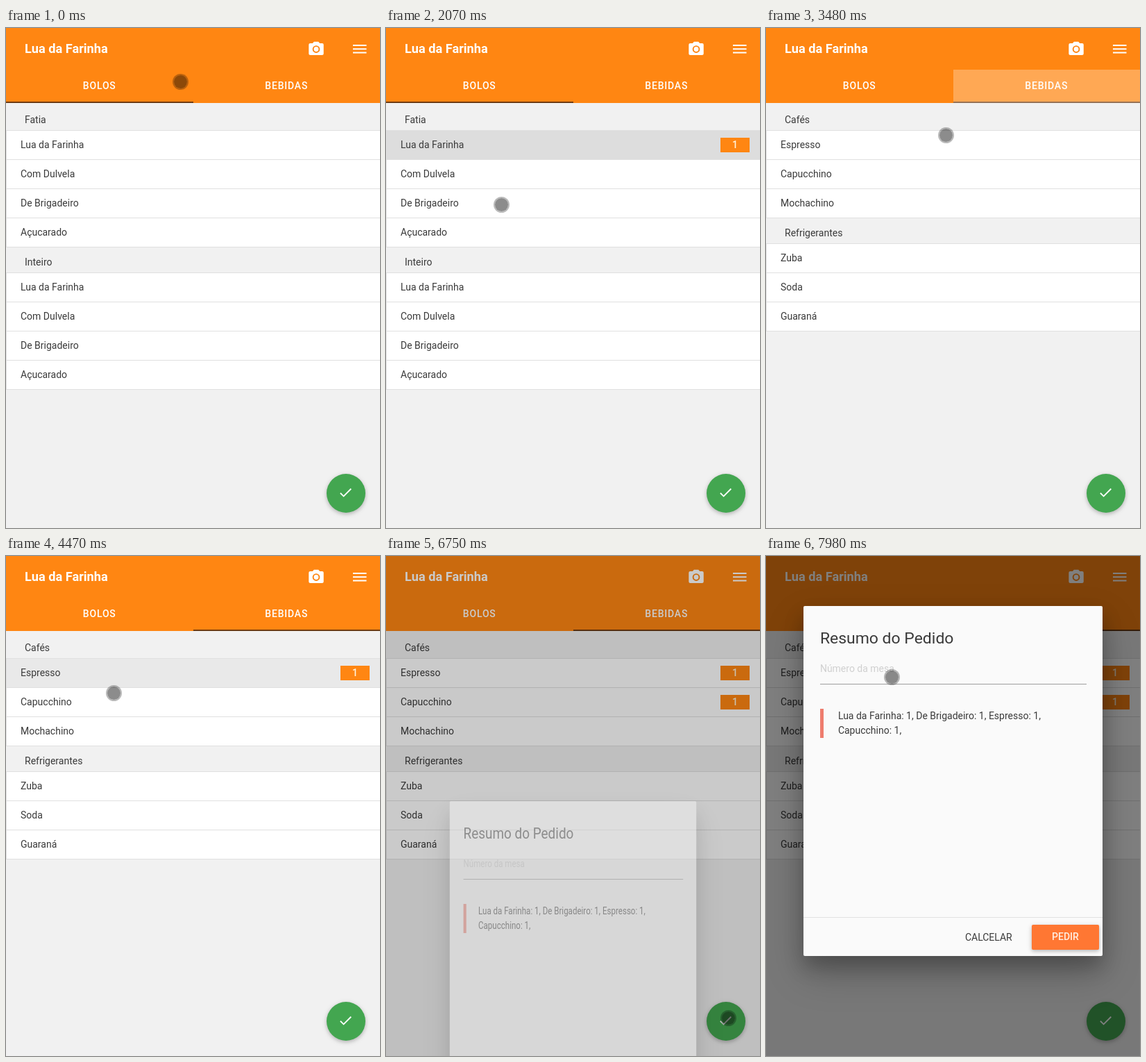
An HTML page for the animation above (8 s loop, 539 px wide and 720 px high).

```html
<!DOCTYPE html>
<html lang="pt">
<head>
<meta charset="utf-8">
<title>Pedido</title>
<style>
  html, body { margin: 0; width: 100%; height: 100%; overflow: hidden; }
  body { background: #f1f1f1; font: 14px/20px Roboto, sans-serif; color: #3a3a3a; }
  div, span, svg { position: absolute; box-sizing: border-box; white-space: nowrap; }
  #stage { left: 0; top: 0; width: 539px; height: 720px; overflow: hidden; background: #f1f1f1; }
  #bar { width: 539px; height: 108px; background: #ff8612; color: #fff; }
  #brand { left: 27px; top: 20px; font-size: 18.2px; font-weight: 700; }
  .tab { top: 60px; width: 269.5px; line-height: 47px; height: 48px; text-align: center; font-weight: 500; letter-spacing: .8px; overflow: hidden; }
  #ripple { width: 620px; height: 620px; margin: -310px; left: 130px; top: 25px; border-radius: 50%; background: #fff; }
  #line { top: 106px; height: 2px; background: #6d3a10; }
  .page { width: 539px; }
  .label { left: 27px; }
  .row { width: 540px; height: 43px; border: 1px solid #e0e0e0; line-height: 41px; padding-left: 20px; }
  .badge { left: 481px; top: 10px; width: 42px; height: 21px; line-height: 21px; background: #ff8612; color: #fff3dc; text-align: center; font-weight: 500; }
  #fab { left: 462px; top: 642px; width: 56px; height: 56px; border-radius: 50%; background: #43a650; box-shadow: 0 2px 5px rgba(0,0,0,.16), 0 2px 8px rgba(0,0,0,.12); }
  #shade { inset: 0; background: #000; }
  #modal { left: 53.9px; width: 431.2px; height: 504px; background: #fafafa; border-radius: 2px;
    box-shadow: 0 16px 28px rgba(0,0,0,.22), 0 25px 55px rgba(0,0,0,.21); }
  #modal h5 { position: absolute; margin: 0; left: 24px; top: 34px; font-size: 22.96px; line-height: 26px; font-weight: 400; }
  #field { left: 24px; top: 80px; width: 384px; height: 33px; color: #d0d0d0; border-bottom: 1px solid #9e9e9e; }
  #quote { left: 24px; top: 148px; height: 42px; line-height: 21px; border-left: 5px solid #ee7d6e; padding-left: 21px; }
  #foot { left: 0; top: 448px; width: 431px; height: 56px; border-top: 1px solid #e2e2e2; }
  #cancel { left: 233px; top: 18px; }
  #order { left: 329px; top: 10px; width: 97px; height: 36px; line-height: 35px; text-align: center; font-weight: 500; color: #ffeee2; background: #ff7733; border-radius: 2px; box-shadow: 0 2px 5px rgba(0,0,0,.18), 0 2px 8px rgba(0,0,0,.12); }
  #cursor { width: 23px; height: 23px; margin: -11.5px; border-radius: 50%; background: rgba(0,0,0,.45); background-clip: padding-box; border: 2px solid rgba(0,0,0,.27); }
</style>
</head>
<body>
<div id="stage">
  <div id="bar">
    <span id="brand">Lua da Farinha</span>
    <svg width="539" height="60" fill="#fff">
      <path transform="translate(434.2 17.7) scale(1.07)" d="M9 2 7.2 4H4a2 2 0 0 0-2 2v12a2 2 0 0 0 2 2h16a2 2 0 0 0 2-2V6a2 2 0 0 0-2-2h-3.2L15 2zm3 15a5 5 0 1 1 0-10 5 5 0 0 1 0 10zm0-1.8a3.2 3.2 0 1 0 0-6.4 3.2 3.2 0 0 0 0 6.4z"/>
      <path d="M500 24h19.5v2H500zm0 5.2h19.5v2H500zm0 5.2h19.5v2H500z"/>
    </svg>
    <div id="line"></div>
    <div class="tab">BOLOS</div>
    <div class="tab" style="left:269.5px">BEBIDAS<div id="ripple"></div></div>
  </div>
  <div class="page" id="cakes"></div>
  <div class="page" id="drinks"></div>
  <div id="fab"><svg width="56" height="56" fill="#fff"><path transform="translate(16 15.5) scale(.95)" d="M9 16.2 4.8 12l-1.4 1.4L9 19 21 7l-1.4-1.4z"/></svg></div>
  <div id="shade"></div>
  <div id="modal">
    <h5>Resumo do Pedido</h5>
    <div id="field">Número da mesa</div>
    <div id="quote">Lua da Farinha: 1, De Brigadeiro: 1, Espresso: 1,<br>Capucchino: 1,</div>
    <div id="foot"><span id="cancel">CALCELAR</span><div id="order">PEDIR</div></div>
  </div>
  <div id="cursor"></div>
</div>
<script>
const LOOP = 8000, TAB_TAP = 3160, RIPPLE = 3080, OPEN = 6595;
const $ = id => document.getElementById(id);
const clamp = u => Math.min(1, Math.max(0, u));
const swing = u => .5 - Math.cos(Math.PI * clamp(u)) / 2;
const easeOut = u => 1 - (1 - clamp(u)) ** 2;

// Each tapped row: page, row index, tap time, time of the next tap.
const taps = [
  ['cakes', 0, 1250, 2450], ['cakes', 2, 2450, TAB_TAP],
  ['drinks', 0, 4370, 4980], ['drinks', 1, 4980, 6560],
];

// Cursor stops: time, x, y.
const path = [
  [0, 251, 77], [250, 251, 77], [900, 152, 170], [1250, 152, 170],
  [1850, 166, 254], [2280, 166, 254], [2900, 398, 84], [3120, 398, 84],
  [3480, 260, 154], [3900, 152, 174], [4250, 152, 174], [4470, 155, 197],
  [4700, 158, 213], [4980, 158, 213], [5750, 493, 665], [7050, 493, 665],
  [7850, 181, 174], [LOOP, 181, 174],
];

function buildPage(id, groups) {
  let top = 147;
  for (const [label, ...items] of groups) {
    $(id).insertAdjacentHTML('beforeend', `<span class="label" style="top:${top - 25}px">${label}</span>`);
    for (const item of items) {
      $(id).insertAdjacentHTML('beforeend',
        `<div class="row" style="top:${top}px">${item}<div class="badge" hidden>1</div></div>`);
      top += 42;
    }
    top += 37;
  }
}
const flavours = ['Lua da Farinha', 'Com Dulvela', 'De Brigadeiro', 'Açucarado'];
buildPage('cakes', [['Fatia', ...flavours], ['Inteiro', ...flavours]]);
buildPage('drinks', [['Cafés', 'Espresso', 'Capucchino', 'Mochachino'], ['Refrigerantes', 'Zuba', 'Soda', 'Guaraná']]);
const rows = { cakes: [...document.querySelectorAll('#cakes .row')], drinks: [...document.querySelectorAll('#drinks .row')] };
document.querySelectorAll('.row').forEach(row => row.style.background = '#fff');

// Monotone cubic interpolation, so that rests stay still and passing points stay smooth.
function along(t, axis) {
  const secant = i => path[i + 1] && path[i]
    ? (path[i + 1][axis] - path[i][axis]) / (path[i + 1][0] - path[i][0]) : 0;
  const slope = i => {
    const a = secant(i - 1), b = secant(i);
    return a * b > 0 ? 2 * a * b / (a + b) : 0;
  };
  let i = 0;
  while (i < path.length - 2 && t >= path[i + 1][0]) i++;
  const span = path[i + 1][0] - path[i][0], u = (t - path[i][0]) / span;
  const blend = u * u * (3 - 2 * u);
  return path[i][axis] * (1 - blend) + path[i + 1][axis] * blend
    + span * u * (1 - u) * ((1 - u) * slope(i) - u * slope(i + 1));
}

function draw(t) {
  $('cakes').style.display = t < TAB_TAP ? '' : 'none';
  $('drinks').style.display = t < TAB_TAP ? 'none' : '';

  for (const [page, index, on, off] of taps) {
    const row = rows[page][index];
    const hover = easeOut((t - on) / 250) - easeOut((t - off) / 250);
    const grey = 255 - 34 * hover;
    row.style.background = `rgb(${grey},${grey},${grey})`;
    row.lastChild.style.display = t >= on ? 'block' : 'none';
  }

  const left = 269.5 * swing((t - TAB_TAP - 90) / 220);
  const right = 269.5 + 269.5 * swing((t - TAB_TAP) / 220);
  $('line').style.left = left + 'px';
  $('line').style.width = right - left + 'px';
  $('ripple').style.transform = `scale(${easeOut((t - RIPPLE) / 400)})`;
  $('ripple').style.opacity = t < RIPPLE ? 0 : .28 * (1 - clamp((t - RIPPLE - 400) / 350));

  const open = swing((t - OPEN) / 350);
  $('shade').style.opacity = open / 2;
  $('modal').style.opacity = open;
  $('modal').style.top = 552 - 480 * open + 'px';
  $('modal').style.transform = open < 1 ? `scaleX(${.7 + .3 * open})` : 'none';

  $('cursor').style.left = along(t, 1) + 'px';
  $('cursor').style.top = along(t, 2) + 'px';
}

const start = performance.now();
function tick() {
  draw((performance.now() - start) % LOOP);
  requestAnimationFrame(tick);
}
tick();
</script>
</body>
</html>
```
